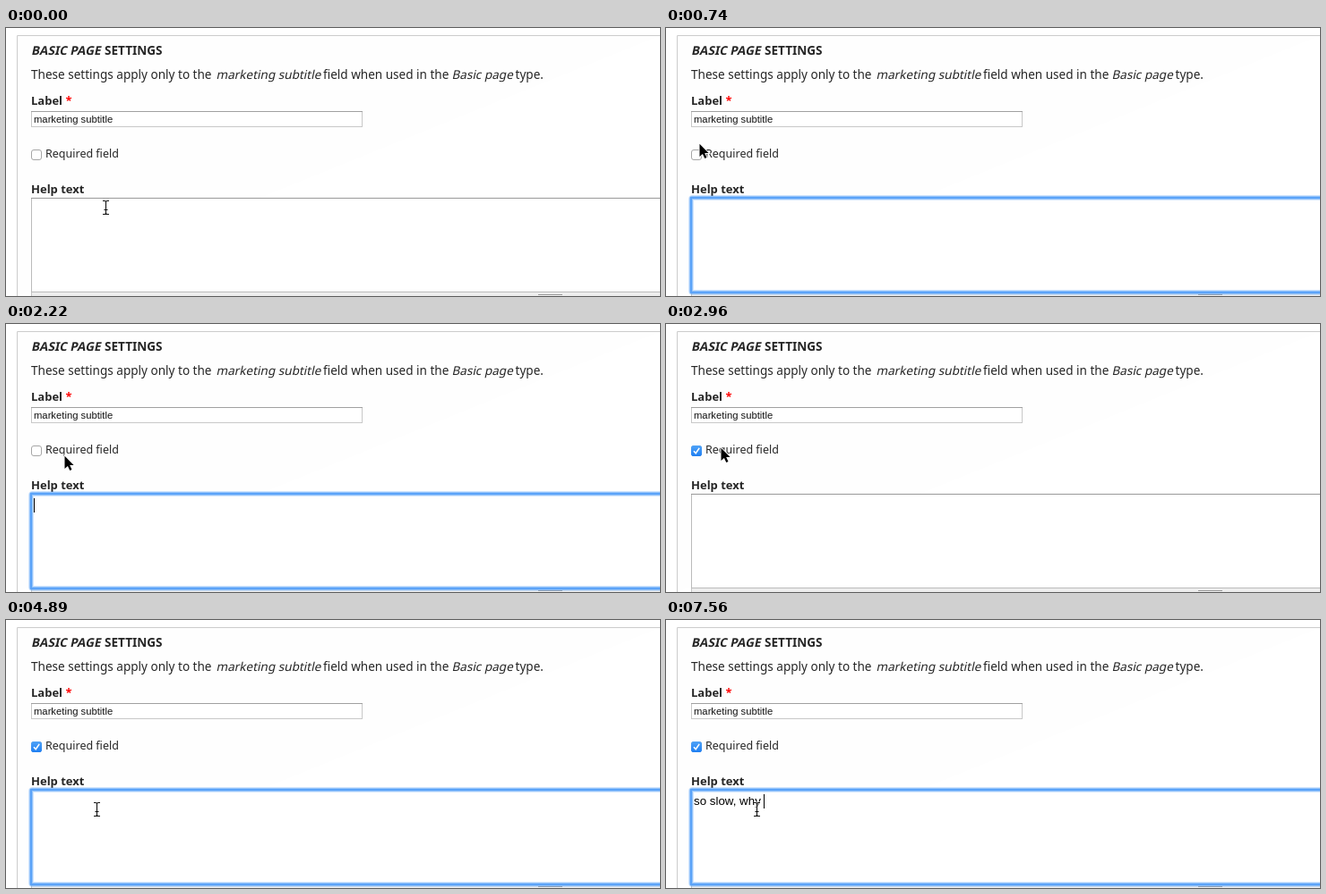
An HTML page that plays this animation: 730x300 px, repeating every 8000 ms.

```html
<!DOCTYPE html>
<html lang="en">
<head>
<meta charset="utf-8">
<title>Field settings form</title>
<style>
  html, body { margin: 0; width: 100%; height: 100%; overflow: hidden; background: #fff; }
  svg { display: block; width: 730px; height: 300px; }
  text { font: 13.55px "Noto Sans", "Open Sans", sans-serif; fill: #262626; white-space: pre; }
  .bold { font-weight: 700; }
  .label { font-size: 13px; }
  .option { font-size: 12.5px; }
  .input { font: 11.25px "Liberation Sans", Arial, sans-serif; fill: #111; }
  .area { font: 13.333px "Liberation Sans", Arial, sans-serif; fill: #000; }
</style>
</head>
<body>
<svg viewBox="0 0 730 300">
  <defs>
    <linearGradient id="blue" x2="0" y2="1">
      <stop stop-color="#4fa3f8"/><stop offset="1" stop-color="#1f7ff2"/>
    </linearGradient>
    <path id="beamShape" d="M-3.5-7.5H-1.5Q0-7.5 0-6Q0-7.5 1.5-7.5H3.5M0-6V6M-3.5 7.5H-1.5Q0 7.5 0 6Q0 7.5 1.5 7.5H3.5M-2 2.5H2" fill="none"/>
  </defs>

  <path d="M12.5 300V8.5H730" fill="#fefefe" stroke="#ccc"/>

  <text class="bold" transform="translate(28 30) skewX(-12)">BASIC PAGE</text>
  <text class="bold" x="110" y="30">SETTINGS</text>

  <text x="28" y="57">These settings apply only to the</text>
  <text transform="translate(234.5 57) skewX(-12)">marketing subtitle</text>
  <text x="354" y="57">field when used in the</text>
  <text transform="translate(497.5 57) skewX(-12)">Basic page</text>
  <text x="568.5" y="57">type.</text>

  <text class="bold label" x="28" y="86">Label <tspan fill="#f00">*</tspan></text>
  <rect x="28.5" y="93.5" width="369" height="17" fill="#fff" stroke="#c8c8c8"/>
  <path d="M28 93.5H398" stroke="#a0a0a0"/>
  <text class="input" x="31" y="106">marketing subtitle</text>

  <rect x="28.5" y="136.5" width="11" height="11" rx="2.5" fill="#fff" stroke="#a6a6a6"/>
  <g id="checked">
    <rect x="28" y="136" width="12" height="12" rx="2.8" fill="url(#blue)"/>
    <path d="M31 142.3L33.2 144.8L37.2 138.9" fill="none" stroke="#fff" stroke-width="1.6"/>
  </g>
  <text class="option" x="44" y="145">Required field</text>

  <text class="bold label" x="28" y="185">Help text</text>
  <rect x="28.5" y="295.5" width="720" height="10" fill="#eee" stroke="#c4c4c4"/>
  <path d="M594 298.5H621" stroke="#999"/>
  <rect x="28.5" y="190.5" width="720" height="105" fill="#fff" stroke="#bbb"/>
  <path d="M28 190.5H730" stroke="#999"/>
  <g id="focus" fill="none" stroke="#5ba3f8">
    <rect x="28" y="190" width="720" height="106" rx="1.5" stroke-width="6" opacity=".28"/>
    <rect x="28" y="190" width="720" height="106" rx="1" stroke-width="4" opacity=".5"/>
    <rect x="28" y="190" width="720" height="106" stroke-width="2"/>
  </g>
  <text id="typed" class="area" x="31" y="207"></text>
  <rect id="caret" y="195" width="1" height="16"/>

  <path id="arrow" d="M.5 .8V15L3.9 12L6.3 17L8.5 16L6.2 11.1H10.6Z" stroke="#fff" paint-order="stroke" stroke-width="1.8"/>
  <g id="beam">
    <use href="#beamShape" stroke="#fff" stroke-width="2.6" opacity=".8"/>
    <use href="#beamShape" stroke="#111" stroke-width="1.1"/>
  </g>
</svg>
<script>
const LOOP = 8000;
const el = id => document.getElementById(id);

// Each track lists [start time, value...] and holds until the next entry.
const pointer = [
  [0, "beam", 111.5, 201], [600, "arrow", 72, 162], [740, "arrow", 37, 129],
  [1040, "arrow", 37, 125], [1630, "arrow", 43, 129], [1780, "arrow", 55, 140],
  [1930, "arrow", 64, 147], [2070, "arrow", 66, 149], [2220, "arrow", 65, 147],
  [2370, "arrow", 63, 142], [2520, "arrow", 62, 139], [2810, "arrow", 61, 138],
  [3100, "arrow", 76, 156], [3250, "beam", 94.5, 204], [3400, "beam", 97.5, 212],
  [3700, "beam", 99.5, 212], [3850, "beam", 101.5, 212]
];
const focus = [[0, false], [300, true], [2520, false], [3400, true]];
const checked = [[0, false], [2670, true]];
const caret = [
  [0, false], [300, true], [740, false], [1330, true], [1780, false],
  [2220, true], [2520, false], [3400, true], [3850, false], [4440, true],
  [4890, false], [5040, true], [6520, false], [6810, true]
];
const phrase = "so slow, why ";
const typedCount = [
  [0, 0], [5040, 1], [5180, 2], [5330, 3], [5630, 5], [5920, 6], [6070, 7],
  [6810, 8], [6960, 9], [7110, 10], [7260, 11], [7560, 13]
];

const at = (track, t) => track.findLast(([start]) => start <= t).slice(1);
const show = (id, on) => el(id).setAttribute("visibility", on ? "visible" : "hidden");

const pen = document.createElement("canvas").getContext("2d");
pen.font = '13.333px "Liberation Sans", Arial, sans-serif';

function render(t) {
  const [shape, x, y] = at(pointer, t);
  for (const id of ["arrow", "beam"]) show(id, id === shape);
  el(shape).setAttribute("transform", `translate(${x} ${y})`);

  show("focus", at(focus, t)[0]);
  show("checked", at(checked, t)[0]);

  const text = phrase.slice(0, at(typedCount, t)[0]);
  el("typed").textContent = text;
  show("caret", at(caret, t)[0]);
  el("caret").setAttribute("x", Math.floor(31 + pen.measureText(text).width));
}

let start;
function tick(now) {
  start ??= now;
  render((now - start) % LOOP);
  requestAnimationFrame(tick);
}
render(0);
requestAnimationFrame(tick);
</script>
</body>
</html>
```
